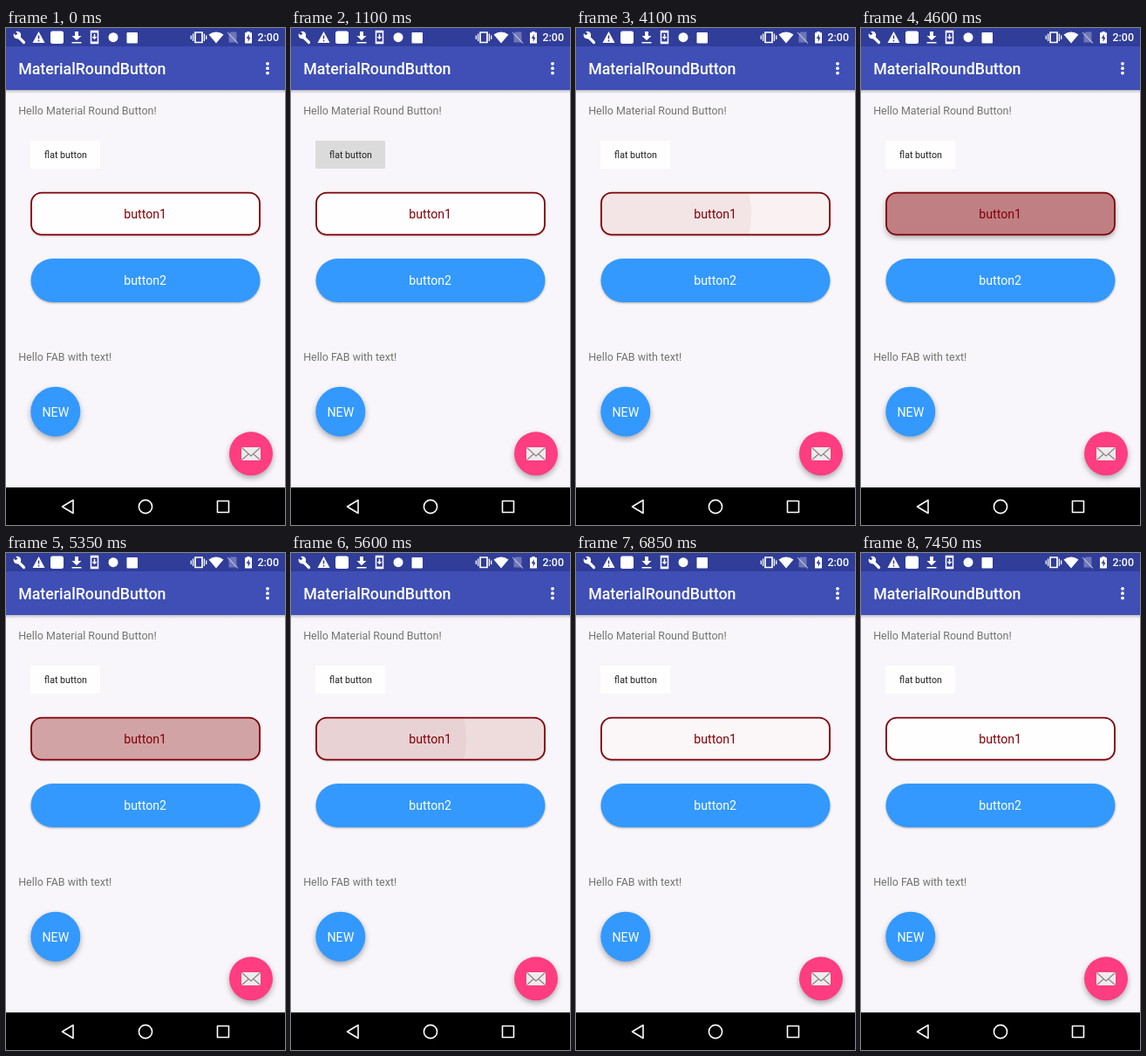
These frames come from a looping animation (320x569 px, 8 s). An HTML page:

```html
<!DOCTYPE html>
<html lang="en">
<head>
<meta charset="utf-8">
<title>Round buttons</title>
<style>
  html, body { margin: 0; width: 100%; height: 100%; overflow: hidden; background: #f8f6fa; }
  svg { display: block; width: 100%; height: 100%; }
  text { font-family: Roboto, "Open Sans", sans-serif; }
  .rest { filter: drop-shadow(0 1.2px 1.1px rgba(0, 0, 0, .3)); }
  .fab { filter: drop-shadow(0 3px 3px rgba(0, 0, 0, .32)); }
  .label { font-size: 12.44px; fill: #737373; }
  .mid { text-anchor: middle; font-size: 14.2px; }
</style>
</head>
<body>
<svg viewBox="0 0 320 569" preserveAspectRatio="none">
  <defs>
    <clipPath id="flatClip"><rect x="28" y="129" width="80" height="32" rx="1"/></clipPath>
    <clipPath id="roundClip"><rect x="29" y="188.5" width="262" height="48.5" rx="12"/></clipPath>
    <linearGradient id="drop" x2="0" y2="1">
      <stop stop-opacity=".22"/><stop offset="1" stop-opacity="0"/>
    </linearGradient>
  </defs>

  <rect width="320" height="569" fill="#f8f6fa"/>
  <rect y="71" width="320" height="4" fill="url(#drop)"/>
  <rect width="320" height="71" fill="#3f4fb5"/>
  <rect width="320" height="21" fill="#303d99"/>

  <!-- status bar -->
  <g fill="#fff">
    <path d="M13 9 20.5 16.5" stroke="#fff" stroke-width="3.2" stroke-linecap="round"/>
    <path d="M9 6.3 11.3 8.6 13.4 6.5 11.1 4.2A4.3 4.3 0 1 1 9 6.3Z"/>
    <path d="M37.500 4 44.500 17H30.500Z"/>
    <path d="M37.500 8.500V12.500M37.500 13.800V15.400" stroke="#303d99" stroke-width="1.5"/>
    <rect x="51" y="3.500" width="15" height="14.500" rx="2.500"/>
    <path d="M79 4H83V9H86.500L81 14.300 75.500 9H79ZM75.500 16H86.500V17.600H75.500Z"/>
    <path d="M97.500 3.500H105.500V17.500H97.500Z" fill="none" stroke="#fff" stroke-width="1.500"/>
    <path d="M97 4H106V5.500H97ZM97 15.500H106V17H97ZM100.700 7H102.300V10H104.500L101.500 13.300 98.500 10H100.700Z"/>
    <circle cx="123" cy="10.700" r="5.500"/>
    <rect x="138.500" y="5" width="12.500" height="12.500" rx="1"/>
    <path d="M217 5H225V16.500H217Z" fill="none" stroke="#fff" stroke-width="1.700"/>
    <path d="M214.600 6.500V15M227.400 6.500V15M212.300 8.500V13M229.700 8.500V13" stroke="#fff" stroke-width="1.300"/>
    <path d="M232.500 7.500Q241 1.500 249.500 7.500L241 17.500Z"/>
    <path d="M257.500 4.500H264.500V16.500H255.500V7Z" opacity=".3"/>
    <path d="M254 5 266 17.500" stroke="#fff" stroke-width="1.100" opacity=".5"/>
    <path d="M276.300 4H279.700V5.300H282V17.500H274V5.300H276.300Z"/>
    <path d="M278.700 7 275.800 12H277.700V16L280.500 10.800H278.700Z" fill="#303d99"/>
    <text x="288.500" y="15" font-size="12.44" font-weight="500">2:00</text>
  </g>

  <!-- app bar -->
  <text x="14.200" y="53" font-size="17.78" font-weight="500" fill="#fff">MaterialRoundButton</text>
  <g fill="#fff">
    <circle cx="300" cy="40.800" r="1.900"/><circle cx="300" cy="46.200" r="1.900"/><circle cx="300" cy="51.600" r="1.900"/>
  </g>

  <text class="label" x="14.200" y="99">Hello Material Round Button!</text>
  <text class="label" x="14.200" y="381">Hello FAB with text!</text>

  <rect x="28" y="129" width="80" height="32" rx="1" fill="#fefefe"/>
  <g id="flat" clip-path="url(#flatClip)"></g>
  <text class="mid" x="68.500" y="149" style="font-size:10.700px" fill="#202020">flat button</text>

  <rect id="body" x="28.800" y="188.500" width="262.400" height="48.300" rx="12" fill="#fffeff"/>
  <g id="round" clip-path="url(#roundClip)"></g>
  <rect x="29" y="188.700" width="262" height="48" rx="12" fill="none" stroke="#800008" stroke-width="1.800"/>
  <text class="mid" x="159.700" y="218" fill="#800008">button1</text>

  <rect class="rest" x="28.500" y="264" width="263" height="50" rx="25" fill="#3399ff"/>
  <text class="mid" x="159.700" y="294" fill="#fff">button2</text>

  <circle class="fab" cx="56.800" cy="439.200" r="28.500" fill="#3399ff"/>
  <text class="mid" x="56.900" y="444.500" fill="#fff">NEW</text>

  <circle class="fab" cx="281" cy="487.300" r="25" fill="#ff3d80"/>
  <rect x="270" y="480" width="22" height="15" rx="1" fill="#ececec"/>
  <path d="M270.500 494.500 278.500 487.500M291.500 494.500 283.500 487.500M270.500 480.500 281 490 291.500 480.500" fill="none" stroke="#8d7f85" stroke-width="1.100"/>

  <!-- navigation bar -->
  <rect y="526" width="320" height="43"/>
  <g fill="none" stroke="#fff" stroke-width="1.600" stroke-linejoin="round">
    <path d="M77 540.500V555.500L64.500 548Z"/>
    <circle cx="160" cy="548" r="7.600"/>
    <rect x="242.500" y="541.500" width="13" height="13"/>
  </g>
</svg>
<script>
const LOOP = 8000;
const $ = id => document.getElementById(id);
const ramp = (t, a, b) => Math.min(1, Math.max(0, (t - a) / (b - a)));

// wash fills the button, wave is the growing circle; speed in px per ms
const buttons = [
  { id: 'flat', color: '#000', cx: 65, cy: 147, wash: .04, wave: .1, rise: 100, speed: .38,
    taps: [{ down: 500, up: 1550, fade: 750 }, { down: 2600, up: 2800, fade: 600 }] },
  { id: 'round', color: '#800008', cx: 100, cy: 213, wash: .293, wave: .293, rise: 600, speed: 1,
    taps: [{ down: 4000, up: 5200, fade: 480 }, { down: 5500, up: 5600, fade: 350 },
           { down: 6100, up: 6400, fade: 500 }, { down: 6950, up: 7100, fade: 350 }] }
];

function add(parent, name, attrs) {
  const el = document.createElementNS('http://www.w3.org/2000/svg', name);
  for (const key in attrs) el.setAttribute(key, attrs[key]);
  return parent.appendChild(el);
}

for (const b of buttons) {
  for (const tap of b.taps) {
    tap.wash = add($(b.id), 'rect', { width: 320, height: 569, fill: b.color });
    tap.wave = add($(b.id), 'circle', { cx: b.cx, cy: b.cy, fill: b.color });
  }
}

function draw(t) {
  let lift = 0;
  for (const b of buttons) {
    for (const { down, up, fade, wash, wave } of b.taps) {
      const held = Math.min(t, up);
      const left = 1 - ramp(t, up, up + fade);
      wash.setAttribute('opacity', b.wash * ramp(held, down, down + 600) * left);
      wave.setAttribute('opacity', b.wave * ramp(held, down, down + b.rise) * left);
      wave.setAttribute('r', Math.max(0, t - down) * b.speed);
      if (b.id === 'round') {
        lift = Math.max(lift, ramp(held, down + 100, down + 200) * (1 - ramp(t, up, up + 100)));
      }
    }
  }
  $('body').style.filter =
    `drop-shadow(0 ${1.2 + 2 * lift}px ${1.1 + 2 * lift}px rgba(0,0,0,${.3 + .05 * lift}))`;
}

const start = performance.now();
function tick() {
  draw((performance.now() - start) % LOOP);
  requestAnimationFrame(tick);
}
tick();
</script>
</body>
</html>
```
